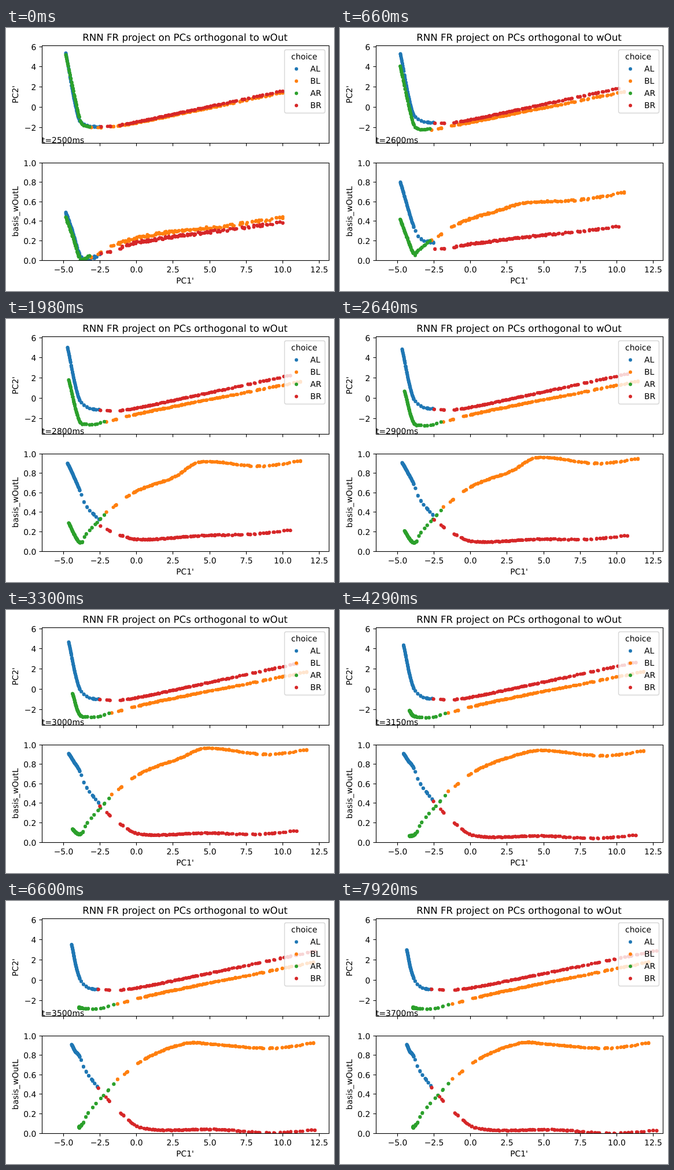
An HTML page with a canvas for the animation above (8000 ms loop, 567x453 px).

```html
<!DOCTYPE html>
<html lang="en">
<head>
<meta charset="utf-8">
<title>RNN FR projection</title>
<style>
html, body { margin: 0; width: 100%; height: 100%; overflow: hidden; background: #fff; }
canvas { display: block; }
</style>
</head>
<body>
<canvas id="stage" width="567" height="453"></canvas>
<script>
const ctx = document.getElementById('stage').getContext('2d');
const LOOP = 8000, STEP = 330, LAST = 24, DOT = 2.95;
const LEFT = 62.5, RIGHT = 558.5;
const TOP = { y0: 30.5, y1: 198.5 }, BOTTOM = { y0: 232.5, y1: 400.5 };

function seeded(seed) {
  return () => {
    seed = (seed * 1664525 + 1013904223) >>> 0;
    return seed / 4294967296;
  };
}

// Progress from 0 to 1 over the steps.
const decay = (t, tau) => (1 - Math.exp(-t / tau)) / (1 - Math.exp(-LAST / tau));
const swing = (t, tau) => 1 - Math.exp(-t / tau) * Math.cos(0.26 * t);
const power = (t, p) => (t / LAST) ** p;
const ramp = (t, end) => Math.min(1, t / end);
const smooth = (t, end) => ramp(t, end) ** 2 * (3 - 2 * ramp(t, end));

// Cubic through the points (ks, vs) with finite-difference slopes.
function curve(ks, vs, k) {
  const n = ks.length;
  let i = 0;
  while (i < n - 2 && k > ks[i + 1]) i++;
  const slope = j => {
    const a = Math.max(0, j - 1), b = Math.min(n - 1, j + 1);
    return (vs[b] - vs[a]) / (ks[b] - ks[a]);
  };
  const h = ks[i + 1] - ks[i], u = (k - ks[i]) / h, v = 1 - u;
  return v * v * (1 + 2 * u) * vs[i] + u * u * (3 - 2 * u) * vs[i + 1]
    + h * u * v * (v * slope(i) - u * slope(i + 1));
}

// Points are [place along the path, first value, last value].
function track(ease, ...points) {
  const places = points.map(p => p[0]);
  return t => {
    const values = points.map(([s, a, b]) => a + (b - a) * ease(t, s));
    return s => curve(places, values, s);
  };
}

// Dots come in close pairs, packed along the path by the density rule.
function pairs(count, seed, density) {
  const rnd = seeded(seed), out = [];
  for (let i = 0; i < count; i++) {
    const s = density((i + 0.9 * (rnd() - 0.5)) / (count - 1));
    for (let j = 0; j < 2; j++) {
      out.push(Math.min(1, Math.max(0, s + 0.012 * (rnd() - 0.5))));
    }
  }
  return out;
}

const bent = u => u < 0.8 ? u / 1.6 : 0.5 + (u - 0.8) * 2.5;
const bulge = u => curve([0, 0.08, 0.7, 1], [0, 0.14, 0.62, 1], u);

const groups = [
  {
    name: 'AL', color: '#1f77b4', dots: pairs(42, 11, bent),
    x: track(t => power(t, 1), [0, 103, 115], [0.5, 127, 127], [1, 163, 158]),
    top: track((t, s) => s ? decay(t, 4) : power(t, 1.4),
      [0, 43, 84], [0.45, 152, 127], [0.6, 165, 142], [0.8, 169, 150], [1, 170, 152]),
    bottom: track((t, s) => decay(t, 1.5 + 5 * s),
      [0, 318, 247], [0.25, 349, 258], [0.5, 390, 267], [0.65, 400, 288], [1, 389, 320])
  },
  {
    name: 'BL', color: '#ff7f0e', dots: pairs(66, 7, bulge),
    x: track(t => decay(t, 8), [0, 147, 194], [1, 478, 533]),
    top: track((t, s) => decay(t, 1.5 + 6 * s),
      [0, 171, 177], [0.1, 170, 168], [0.25, 162, 156], [1, 111, 105]),
    bottom: track((t, s) => (s > 0.4 ? swing : decay)(t, 5 - 1.7 * s),
      [0, 395, 306], [0.15, 370, 269], [0.35, 354, 244], [0.48, 349, 246],
      [0.8, 336, 253], [1, 326, 244])
  },
  {
    name: 'AR', color: '#2ca02c', dots: pairs(42, 29, bent),
    x: track((t, s) => s ? decay(t, 7) : smooth(t, 20),
      [0, 103, 126], [0.5, 127, 132], [1, 144, 187]),
    top: track((t, s) => s ? decay(t, 4) : ramp(t, 14),
      [0, 46, 183], [0.45, 148, 184], [0.6, 165, 185.5], [0.8, 168, 185], [1, 170, 178]),
    bottom: track((t, s) => s < 0.4 ? smooth(t, 14) : decay(t, 5 * s),
      [0, 326, 390], [0.25, 360, 389], [0.5, 397, 384], [0.6, 400, 368], [1, 392, 314])
  },
  {
    name: 'BR', color: '#d62728', dots: pairs(66, 7, bulge),
    x: track(t => power(t, 1.2), [0, 164, 158], [1, 478, 547]),
    top: track((t, s) => decay(t, 5 + 5 * s),
      [0, 170, 152], [0.12, 166, 152], [0.25, 158, 144], [1, 108, 85]),
    bottom: track(t => 1 - Math.exp(-((t / 8) ** 1.5)),
      [0, 389, 321], [0.1, 379, 363], [0.2, 369, 391], [0.55, 353, 394],
      [0.8, 343, 400], [1, 334, 395])
  }
];

function dot(x, y) {
  ctx.beginPath();
  ctx.arc(x, y, DOT, 0, 2 * Math.PI);
  ctx.fill();
}

function text(str, x, y, align = 'left', size = 13.89) {
  ctx.font = `${size}px "DejaVu Sans", sans-serif`;
  ctx.textRendering = 'geometricPrecision';
  ctx.textAlign = align;
  ctx.fillText(str, x, y);
}

function sideLabel(str, y) {
  ctx.save();
  ctx.translate(21, y);
  ctx.rotate(-Math.PI / 2);
  text(str, 0, 0, 'center');
  ctx.restore();
}

function line(x0, y0, x1, y1) {
  ctx.beginPath();
  ctx.moveTo(x0, y0);
  ctx.lineTo(x1, y1);
  ctx.stroke();
}

function scatter(panel, side, step) {
  const noise = 0.8 + (side === 'bottom' ? 1.4 * Math.exp(-step / 2) : 0);
  ctx.save();
  ctx.beginPath();
  ctx.rect(LEFT, panel.y0, RIGHT - LEFT, panel.y1 - panel.y0);
  ctx.clip();
  groups.forEach((g, i) => {
    const x = g.x(step), y = g[side](step), rnd = seeded(i * 97 + 5);
    ctx.fillStyle = g.color;
    for (const s of g.dots) dot(x(s) + 0.5, y(s) + 0.5 + noise * (2 * rnd() - 1));
  });
  ctx.restore();
}

const number = (v, digits) => v.toFixed(digits).replace('-', '\u2212');

function axes(panel, ticks) {
  ctx.strokeStyle = ctx.fillStyle = '#000';
  ctx.lineWidth = 1.11;
  ctx.strokeRect(LEFT, panel.y0, RIGHT - LEFT, panel.y1 - panel.y0);
  for (const [label, y] of ticks) {
    line(LEFT - 5, y, LEFT, y);
    text(label, 52.3, Math.round(y + 5), 'right');
  }
  for (let i = 0; i < 8; i++) {
    const x = Math.floor(99.3 + i * 63.2) + 0.5;
    line(x, panel.y1, x, panel.y1 + 5);
    if (panel === BOTTOM) text(number(2.5 * i - 5, 1), x, 421, 'center');
  }
}

function legend() {
  ctx.beginPath();
  ctx.roundRect(481.5, 37.5, 70, 109, 3);
  ctx.fillStyle = 'rgba(255,255,255,0.8)';
  ctx.fill();
  ctx.strokeStyle = 'rgba(204,204,204,0.8)';
  ctx.lineWidth = 1.39;
  ctx.stroke();
  ctx.fillStyle = '#000';
  text('choice', 515.5, 54, 'center');
  groups.forEach((g, i) => {
    const y = 70.5 + i * 21;
    ctx.fillStyle = g.color;
    dot(502, y);
    ctx.fillStyle = '#000';
    text(g.name, 526, Math.round(y + 4.5));
  });
}

const topTicks = [6, 4, 2, 0, -2].map(v => [number(v, 0), Math.floor(136.4 - 17.4 * v) + 0.5]);
const bottomTicks = [0, 1, 2, 3, 4, 5].map(i => [number(i / 5, 1), Math.floor(400 - 33.6 * i) + 0.5]);

function draw(ms) {
  const step = Math.floor((ms % LOOP) / STEP);
  ctx.fillStyle = '#fff';
  ctx.fillRect(0, 0, 567, 453);
  scatter(TOP, 'top', step);
  scatter(BOTTOM, 'bottom', step);
  axes(TOP, topTicks);
  axes(BOTTOM, bottomTicks);
  text('RNN FR project on PCs orthogonal to wOut', 309.5, 22, 'center', 16.67);
  sideLabel("PC2'", 114.5);
  sideLabel('basis_wOutL', 316);
  text("PC1'", 309.5, 440, 'center');
  text(`t=${2500 + 50 * step}ms`, 62, 198);
  legend();
}

const start = performance.now();
function tick() {
  draw(performance.now() - start);
  requestAnimationFrame(tick);
}
tick();
</script>
</body>
</html>
```
